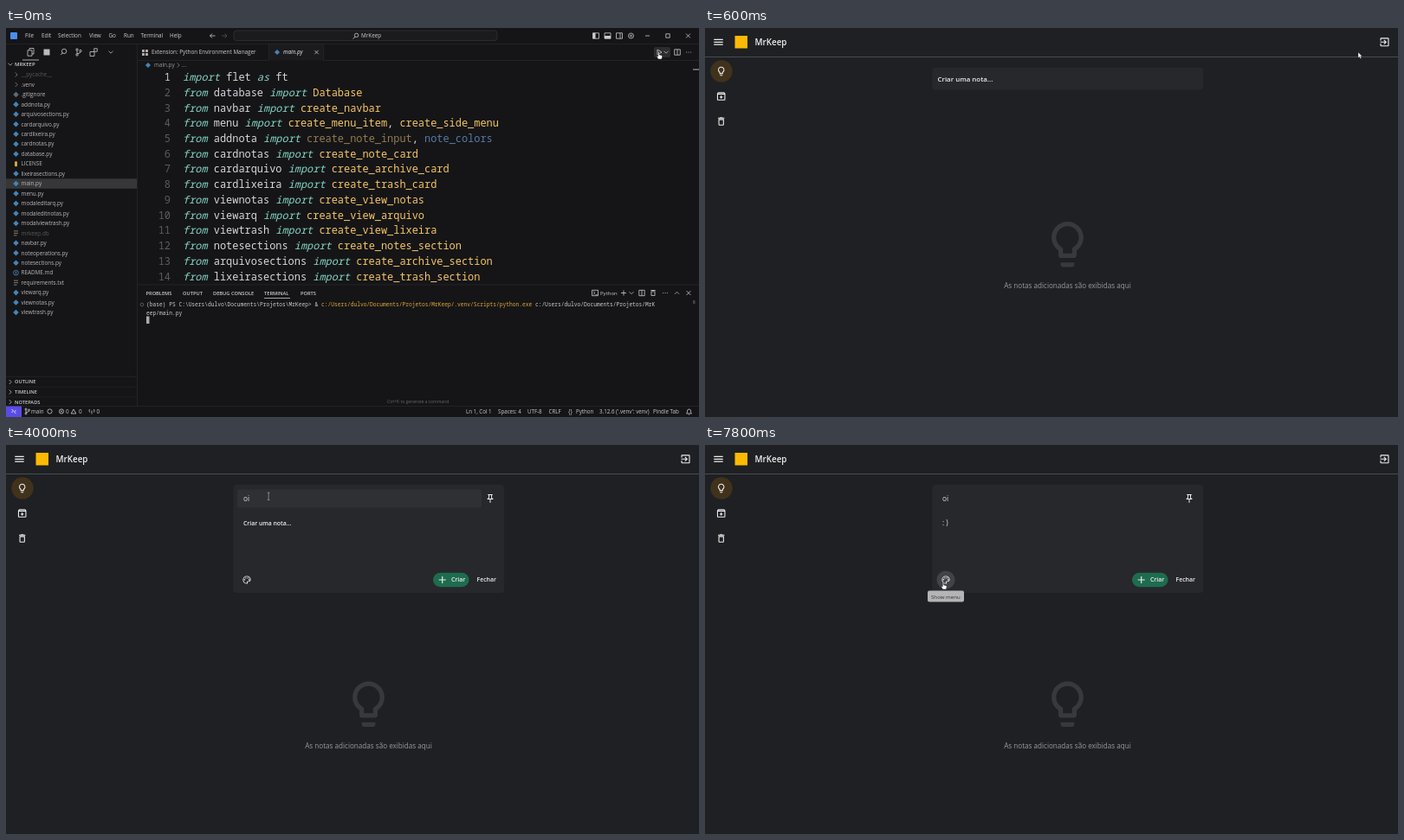
Write an HTML page that moves like this. It is 800 by 450 pixels and loops after 8000 ms.

```html
<!DOCTYPE html>
<html lang="pt">
<head>
<meta charset="utf-8">
<title>MrKeep</title>
<style>
html, body { margin: 0; width: 100%; height: 100%; overflow: hidden; background: #151517; }
svg { display: block; width: 800px; height: 450px; }
text { font-family: "Open Sans", "Noto Sans", sans-serif; white-space: pre; }
.mono { font-family: "Noto Sans Mono", "DejaVu Sans Mono", monospace; }
</style>
</head>
<body>
<svg id="stage" viewBox="0 0 800 450"></svg>
<script>
const LOOP = 8000, STEP = 200;

// Drawing helpers; text is placed by its vertical middle.
const text = (x, y, s, size = 6.35, fill = '#ccc', more = '') =>
  `<text x="${x}" y="${y + size * .35}" font-size="${size}" fill="${fill}" ${more}>${s}</text>`;
const rect = (x, y, w, h, fill, r = 0, more = '') =>
  `<rect x="${x}" y="${y}" width="${w}" height="${h}" rx="${r}" fill="${fill}" ${more}/>`;
const line = (d, color = '#ccc', w = .8) =>
  `<path d="${d}" fill="none" stroke="${color}" stroke-width="${w}"/>`;
const at = (x, y, s, more = '') => `<g transform="translate(${x} ${y})" ${more}>${s}</g>`;
const group = (id, s, more = '') => `<g id="${id}" ${more}>${s}</g>`;
const icon = (x, y, scale, d, fill = '#eee') =>
  `<path transform="translate(${x - 12 * scale} ${y - 12 * scale}) scale(${scale})" d="${d}" fill="${fill}"/>`;
const diamond = (x, y, r = 3, fill = '#4584b8') =>
  rect(x - r * .72, y - r * .72, r * 1.44, r * 1.44, fill, 0, `transform="rotate(45 ${x} ${y})"`);
const cross = (x, y, r = 2.4, color) =>
  line(`M${x - r} ${y - r}l${2 * r} ${2 * r}m0 ${-2 * r}l${-2 * r} ${2 * r}`, color);
const plus = (x, y, r, color, w) => line(`M${x - r} ${y}h${2 * r}M${x} ${y - r}v${2 * r}`, color, w);
const chevron = (x, y, turn = 0, color = '#bbb') =>
  at(x, y, line('M-1.3 -2.5L1.2 0L-1.3 2.5', color), '').replace(')"', `) rotate(${turn})"`);
const box = (x, y, w = 7, h = 6.4, extra = '') =>
  line(`M${x - w / 2} ${y - h / 2}h${w}v${h}h${-w}z${extra}`);
const ring = (x, y, r, color = '#ccc') => `<circle cx="${x}" cy="${y}" r="${r}" fill="none" stroke="${color}" stroke-width=".8"/>`;
const lens = (x, y, r = 2.2) => ring(x + .6, y - .6, r) + line(`M${x - 1} ${y + 1}l-2.4 2.6`);
const dots = (x, y) => [-2.4, 0, 2.4].map(d => rect(x + d - .5, y - .5, 1, 1, '#ccc', .5)).join('');
const bold = 'font-weight="600"';

const ICON = {
  bulb: 'M9 21c0 .55.45 1 1 1h4c.55 0 1-.45 1-1v-1H9zm3-19C8.14 2 5 5.14 5 9c0 2.38 1.19 4.47 3 5.74V17c0 .55.45 1 1 1h6c.55 0 1-.45 1-1v-2.26c1.81-1.27 3-3.36 3-5.74 0-3.86-3.14-7-7-7zm2.85 11.1l-.85.6V16h-4v-2.3l-.85-.6A5 5 0 0 1 7 9c0-2.76 2.24-5 5-5s5 2.24 5 5c0 1.63-.8 3.16-2.15 4.1z',
  archive: 'M20.5 5.2l-1.4-1.7Q18.7 3 18 3H6q-.7 0-1.2.5L3.5 5.2Q3 5.8 3 6.5V19a2 2 0 0 0 2 2h14a2 2 0 0 0 2-2V6.5q0-.7-.5-1.3zM6.2 5h11.6l.8 1H5.4zM5 19V8h14v11zm8-9h-2v3H8l4 4 4-4h-3z',
  trash: 'M16 9v10H8V9h8m-1.5-6h-5l-1 1H5v2h14V4h-3.5zM18 7H6v12a2 2 0 0 0 2 2h8a2 2 0 0 0 2-2z',
  menu: 'M3 18h18v-2H3zm0-5h18v-2H3zm0-7v2h18V6z',
  exit: 'M10.1 15.6L11.5 17l5-5-5-5-1.4 1.4 2.6 2.6H3v2h9.7zM19 3H5a2 2 0 0 0-2 2v4h2V5h14v14H5v-4H3v4a2 2 0 0 0 2 2h14a2 2 0 0 0 2-2V5a2 2 0 0 0-2-2z',
  pin: 'M14 4v5c0 1.1.4 2.2 1 3H9c.6-.9 1-1.9 1-3V4h4m3-2H7a1 1 0 0 0 0 2h1v5a3 3 0 0 1-3 3v2h6v7l1 1 1-1v-7h6v-2a3 3 0 0 1-3-3V4h1a1 1 0 0 0 0-2z',
  palette: 'M12 22a10 10 0 1 1 0-20c5.5 0 10 4 10 9a6 6 0 0 1-6 6h-1.8q-.8.2-.3.8a2.5 2.5 0 0 1-1.9 4.2zm0-18a8 8 0 1 0 0 16q.8-.2.4-.9a2.5 2.5 0 0 1 1.8-4.1H16a4 4 0 0 0 4-4c0-3.9-3.6-7-8-7zM5 11.5a1.5 1.5 0 1 0 3 0 1.5 1.5 0 1 0-3 0M8 7.5a1.5 1.5 0 1 0 3 0 1.5 1.5 0 1 0-3 0M13 7.5a1.5 1.5 0 1 0 3 0 1.5 1.5 0 1 0-3 0M16 11.5a1.5 1.5 0 1 0 3 0 1.5 1.5 0 1 0-3 0'
};

function titleBar() {
  const menus = { File: 22, Edit: 41, Selection: 60, View: 96, Go: 118.5, Run: 136, Terminal: 155.5, Help: 189 };
  return rect(5, 5, 8, 8, '#4a8df0', 1)
    + Object.entries(menus).map(([s, x]) => text(x, 9, s)).join('')
    + line('M241.500 9h-6m2.500-2.500l-2.500 2.500l2.500 2.500') + line('M249 9h6m-2.500-2.500l2.500 2.500l-2.500 2.500', '#555')
    + rect(263, 3, 304, 11.5, '#1b1b1d', 3, 'stroke="#353538" stroke-width=".7"')
    + lens(404, 9) + text(410, 9, 'MrKeep')
    + box(681, 9) + rect(677.5, 5.8, 3, 6.4, '#ccc') + box(694.5, 9) + rect(691, 9, 7, 3.2, '#ccc')
    + box(708, 9, 7, 6.4, 'm4.500 0v6.400') + ring(721.5, 9, 3) + ring(721.5, 9, 1)
    + line('M738 9h5') + box(764, 9, 4.4, 4.4) + cross(787.5, 9)
    + line('M0 18.500H800', '#28282b');
}

function sidebar() {
  const names = '__pycache__ .venv .gitignore addnota.py arquivosections.py cardarquivo.py cardlixeira.py cardnotas.py database.py LICENSE lixeirasections.py main.py menu.py modaleditarq.py modaleditnotas.py modalviewtrash.py mrkeep.db navbar.py noteoperations.py notesections.py README.md requirements.txt viewarq.py viewnotas.py viewtrash.py'.split(' ');
  const rows = names.map((name, i) => {
    const y = 54 + i * 11.46, dim = i === 0 || name.endsWith('.db');
    const mark = i < 2 ? chevron(12, y, 0, '#888')
      : name.endsWith('.py') || i === 2 ? diamond(11.5, y, 3.2, i === 2 ? '#5a6b7c' : undefined)
      : name === 'LICENSE' ? rect(10, y - 3, 3, 6, '#d5a72f', 1)
      : name === 'README.md' ? ring(11.5, y, 2.8, '#4a9bd0') + rect(11.1, y - 1.5, .8, 3, '#4a9bd0')
      : line(`M9 ${y - 2.5}h5m-5 2.500h5m-5 2.500h3.500`, '#999');
    return mark + text(17.5, y, name, 6.35, dim ? '#58585b' : '#b9b9bc');
  }).join('');
  const heads = ['OUTLINE', 'TIMELINE', 'NOTEPADS'].map((s, i) => {
    const y = 409.5 + i * 11.6;
    return line(`M0 ${y - 6}H151`, '#242427') + chevron(5, y) + text(10, y, s, 5.7, '#ccc', bold);
  }).join('');
  return box(27.5, 29, 5, 6.5) + line('M27 25.500v-2h5v6.500h-2') + line('M19 37H38', '#ccc')
    + rect(43.5, 24.5, 7, 7, '#bbb') + lens(66.5, 27.5, 2.7)
    + ring(82, 25, 1.2) + ring(82, 31, 1.2) + ring(86, 26.5, 1.2) + line('M82 26.200v3.600M86 27.700q0 1.700-4 2')
    + box(99.5, 30, 5, 5) + box(103.5, 25.5, 3.5, 3.5) + chevron(121, 28, 90)
    + chevron(5, 42, 90) + text(10, 42, 'MRKEEP', 6, '#ccc', bold)
    + rect(0, 174.3, 151, 11.5, '#37373a') + rows + heads + line('M151.500 18V437', '#28282b');
}

function editor() {
  const code = `flet||ft
database|Database
navbar|create_navbar
menu|create_menu_item, create_side_menu
addnota|create_note_input, note_colors
cardnotas|create_note_card
cardarquivo|create_archive_card
cardlixeira|create_trash_card
viewnotas|create_view_notas
viewarq|create_view_arquivo
viewtrash|create_view_lixeira
notesections|create_notes_section
arquivosections|create_archive_section
lixeirasections|create_trash_section`.split('\n');
  const span = (s, color) => `<tspan fill="${color}">${s}</tspan>`;
  const word = s => `<tspan fill="#83d6c5" font-style="italic">${s}</tspan>`;
  const rows = code.map((row, i) => {
    const [mod, what, alias] = row.split('|'), y = 57 + i * 17.72;
    const names = what.split(', ').map(n =>
      span(n, n === 'note_colors' ? '#5779a8' : n === 'create_note_input' ? '#947b50' : '#f5c566'));
    const s = alias ? `${word('import')} ${mod} ${word('as')} ${alias}`
      : `${word('from')} ${mod} ${word('import')} ${names.join(', ')}`;
    return text(190, y, i + 1, 11.93, i ? '#5c5c60' : '#ccc', 'class="mono" text-anchor="end"')
      + text(204, y, s, 11.93, '#d6d6dd', 'class="mono"');
  }).join('');
  return rect(303, 19, 63, 18.5, '#1b1b1e') + line('M152 37.500H303M366 37.500H800M303.500 19v18M366.500 19v18', '#28282b')
    + rect(157, 25, 3, 3, '#aaa') + rect(161, 25, 3, 3, '#aaa') + rect(157, 29, 3, 3, '#aaa') + rect(161, 29, 3, 3, '#aaa')
    + text(168, 28, 'Extension: Python Environment Manager')
    + diamond(313, 28) + text(320, 28, 'main.py', 6.35, '#eee', 'font-style="italic"') + cross(358.5, 28, 2.2)
    + line('M752 25l5 3l-5 3z') + chevron(762, 28, 90) + box(775, 28, 6.6, 6.4, 'm3.300 0v6.400') + dots(788, 28)
    + diamond(164, 43) + text(171, 43, 'main.py', 6.35, '#999') + chevron(199, 43, 0, '#888') + text(203, 43, '...', 6.35, '#999')
    + rows + line('M793 48H800', '#bbb', 1);
}

function terminal() {
  const tabs = { PROBLEMS: 161.5, OUTPUT: 204, 'DEBUG CONSOLE': 239, TERMINAL: 298, PORTS: 340 };
  const home = 'c:/Users/dulvo/Documents/Projetos/';
  const row = `(base) PS C:\\Users\\dulvo\\Documents\\Projetos\\MrKeep&gt; &amp; <tspan fill="#e3a93a">${home}MrKeep/.venv/Scripts/python.exe</tspan> ${home}MrK`;
  return line('M152 297H800', '#28282b')
    + Object.entries(tabs).map(([s, x]) => text(x, 307, s, 5.7, '#ccc', bold)).join('')
    + line('M298 312.500h30', '#ccc')
    + box(680, 306.5, 7, 6.4) + line('M678 304.700l2 1.800l-2 1.800m2.500 .300h2') + text(686, 307, 'Python', 6)
    + plus(713, 306.500, 3) + chevron(722, 306.5, 90) + box(734, 306.5, 6.4, 6.4, 'm3.200 0v6.400')
    + icon(747, 306.5, .4, ICON.trash, '#ccc') + dots(761, 306.5) + chevron(774.5, 306.5, -90) + cross(788, 306.5)
    + ring(157, 320, 1.8, '#666')
    + text(162, 320, row, 6.24, '#ccc', 'class="mono"') + text(162, 329.5, 'eep/main.py', 6.24, '#ccc', 'class="mono"')
    + rect(162, 333.5, 3.5, 8.5, '#aaa') + rect(793, 315, 2.5, 4, '#444')
    + text(440, 432.5, 'Ctrl+K to generate a command', 5, '#66666a');
}

function statusBar() {
  const items = { main: 29, 'Ln 1, Col 1': 531, 'Spaces: 4': 568, 'UTF-8': 602, CRLF: 626.5, Python: 658,
    "3.12.6 ('.venv': venv)": 685, 'Pindle Tab': 747 };
  return rect(0, 437, 800, 13, '#151517') + line('M0 437.500H800', '#28282b') + rect(0, 437.5, 18, 12.5, '#5a4be8')
    + line('M6.500 441l2 2l-2 2m5-3l-2 2l2 2', '#fff')
    + ring(23, 441, 1) + ring(23, 446, 1) + ring(26.5, 442, 1) + line('M23 442v3M26.500 443q0 1.500-3.500 1.500')
    + ring(50.5, 443.5, 2.6) + ring(64, 443.5, 2.6) + cross(64, 443.5, 1) + text(69, 443.5, '0')
    + line('M78 441l-2.800 5h5.600z') + text(84, 443.5, '0')
    + line('M99 446.500v-4m-2.500-1.500q-1 2 0 3.500m5-3.500q1 2 0 3.500') + text(104.5, 443.5, '0')
    + text(649, 443.5, '{}', 6.5) + line('M785.500 446h6l-1-1.500v-1.500a2 2 0 0 0-4 0v1.500zm2.500 1.200h1')
    + Object.entries(items).map(([s, x]) => text(x, 443.5, s, 6.2)).join('');
}

const ide = () => rect(0, 0, 800, 450, '#151517') + titleBar() + sidebar() + editor() + terminal() + statusBar();

const splash = () => rect(8, 4.5, 665, 374.5, '#0d0e11', 3, 'fill-opacity=".4" stroke="#0b4976" stroke-width=".9"')
  + rect(8, 5, 665, 15, '#053d66', 3, 'fill-opacity=".85"')
  + rect(11, 10.5, 5, 5, '#3c6388') + text(20, 13, 'MrKeep', 6.3, '#9fb2c2')
  + line('M608 13h5', '#9fb2c2') + box(635, 13, 4, 4) + cross(660, 13, 2.2, '#9fb2c2')
  + `<path d="M304 18.500H366" stroke="#2d7fc0" stroke-dasharray="1.500 1"/>`
  + rect(339.5, 191, 1.6, 1.6, '#aaa', .8);

const composer = () => rect(262.5, 46, 312.5, 125, '#27282b', 4)
  + group('titleHover', rect(267, 51.5, 282, 21, '#2f3033', 2))
  + group('bodyHover', rect(267, 78, 303, 24.5, '#2f3033', 2))
  + group('title', '') + group('body', '')
  + icon(559, 62, .49, ICON.pin)
  + group('paletteHover', '<circle cx="278" cy="156" r="10.500" fill="#424347"/>')
  + icon(278, 156, .46, ICON.palette)
  + rect(493, 147.7, 41.5, 16.6, '#1e6c4f', 8.3) + plus(503.7, 156, 4, '#eee', 1.1)
  + text(514, 156, 'Criar', 6.9, '#f0f0f0', bold) + text(543.5, 156, 'Fechar', 6.9, '#f0f0f0', bold)
  + group('tip', rect(257, 168.5, 42, 13, '#b4b4b6', 2) + text(261, 175.5, 'Show menu', 6.15, '#333'));

const app = () => rect(0, 0, 800, 450, '#1f2023') + line('M0 33.500H800', '#4a4b4e', 1)
  + icon(15.5, 16.3, .58, ICON.menu) + group('logo', rect(34.5, 9, 14.5, 14.5, '#fbb904'))
  + text(57.5, 17, 'MrKeep', 9.8, '#eee', bold) + icon(784.5, 16.3, .56, ICON.exit)
  + '<circle cx="19" cy="50" r="12.700" fill="#41321c"/>'
  + icon(18.7, 50, .53, ICON.bulb) + icon(18.7, 79, .53, ICON.archive) + icon(18.7, 108, .53, ICON.trash)
  + group('hint', icon(418.5, 250.2, 2.63, ICON.bulb, '#38393c')
    + text(418.5, 298.3, 'As notas adicionadas são exibidas aqui', 8.12, '#98999c', 'text-anchor="middle"'))
  + group('field', rect(262.5, 46, 312.5, 25.5, '#27282b', 4) + text(268.5, 59.3, 'Criar uma nota...', 7.9, '#eee', bold))
  + group('composer', composer());

const POINTER = {
  arrow: '<path d="M0 0V6.600L1.500 5.300L2.600 7.600L3.700 7.100L2.700 4.800H4.600Z" fill="#fff" stroke="#222" stroke-width=".4"/>',
  beam: line('M-1.300 -4.200H1.300M0 -4.200V4.200M-1.300 4.200H1.300', '#aaa', .7),
  hand: '<path d="M-.700 0Q0-.800.700 0V3L3.500 3.700Q4.300 4 4.100 5L3.500 8H-.500L-2.300 5Q-2.300 4-.700 4.800Z" fill="#fff" stroke="#222" stroke-width=".5"/>'
};

// time, x, y, pointer shape from that time on
const PATH = [
  [0, 753.5, 28, 'hand'], [200, 754, 28, 'arrow'], [600, 754, 28, 'arrow'],
  [1200, 330, 59, 'beam'], [1400, 303, 58, 'beam'], [1600, 303, 54, 'arrow'], [1800, 303, 51, 'arrow'],
  [2400, 300.5, 54, 'beam'], [3000, 300.5, 55, 'beam'], [3200, 300.5, 55, ''],
  [3800, 300.5, 57, 'beam'], [5000, 335.5, 89, 'beam'], [5400, 335.5, 89, ''],
  [7200, 326, 100, 'arrow'], [7600, 279, 155, 'hand'], [7800, 275, 159, 'hand'], [8000, 275, 159, 'hand']
];

function pointerAt(t) {
  const i = PATH.findLastIndex(p => p[0] <= t), [t0, x0, y0, shape] = PATH[i];
  const [t1, x1, y1] = PATH[i + 1], k = (t - t0) / (t1 - t0), e = k * k * (3 - 2 * k);
  return shape && at(x0 + (x1 - x0) * e, y0 + (y1 - y0) * e, POINTER[shape]);
}

// latest entry whose time has come
const pick = (t, list) => list.findLast(p => p[0] <= t)[1];
const TITLE = [[0, ''], [3200, 'o'], [3400, 'oi']];
const BODY = [[0, ''], [5400, ':'], [5600, ':)'], [6000, ':'], [6600, ': )']];

const $ = id => document.getElementById(id);
const show = (id, on) => $(id).setAttribute('display', on ? 'inline' : 'none');

$('stage').innerHTML = group('ide', ide() ) + group('runHover', rect(748, 22, 19, 12, '#fff', 2, 'opacity=".1"'))
  + group('splash', splash()) + group('backing', rect(42, 20, 614, 347, '#08090b'))
  + group('app', app()) + group('pointer', '');

function draw(t) {
  const opening = t < 600, open = t >= 1600;
  show('ide', opening);
  show('runHover', t < 200);
  show('splash', t >= 200 && opening);
  $('splash').setAttribute('opacity', t < 400 ? .5 : 1);
  show('backing', t >= 400 && opening);
  show('app', t >= 400);
  $('app').setAttribute('opacity', opening ? .5 : 1);
  $('app').setAttribute('transform', opening ? 'translate(42 20) scale(.7675 .771)' : '');
  show('logo', !opening);
  show('field', !open);
  show('composer', open);
  $('hint').setAttribute('transform', `translate(0 ${open ? 49.5 : 0})`);
  show('titleHover', t >= 2400 && t < 4400);
  show('bodyHover', t >= 4800 && t < 7400);
  show('paletteHover', t >= 7600);
  show('tip', t >= 7800);
  const title = pick(t, TITLE), body = pick(t, BODY);
  $('title').innerHTML = title ? text(274, 62, title, 8.2, '#e2e2e4') : text(274, 62, 'Título', 8, '#eee', bold);
  $('body').innerHTML = body ? text(274, 90.3, body, 8.1, '#e2e2e4') : text(274, 90.3, 'Criar uma nota...', 6.85, '#eee', bold);
  $('pointer').innerHTML = pointerAt(t);
}

let last = -1, start;
function tick(now) {
  start ??= now;
  const t = Math.floor((now - start) % LOOP / STEP) * STEP;
  if (t !== last) draw(last = t);
  requestAnimationFrame(tick);
}
draw(0);
requestAnimationFrame(tick);
</script>
</body>
</html>
```
